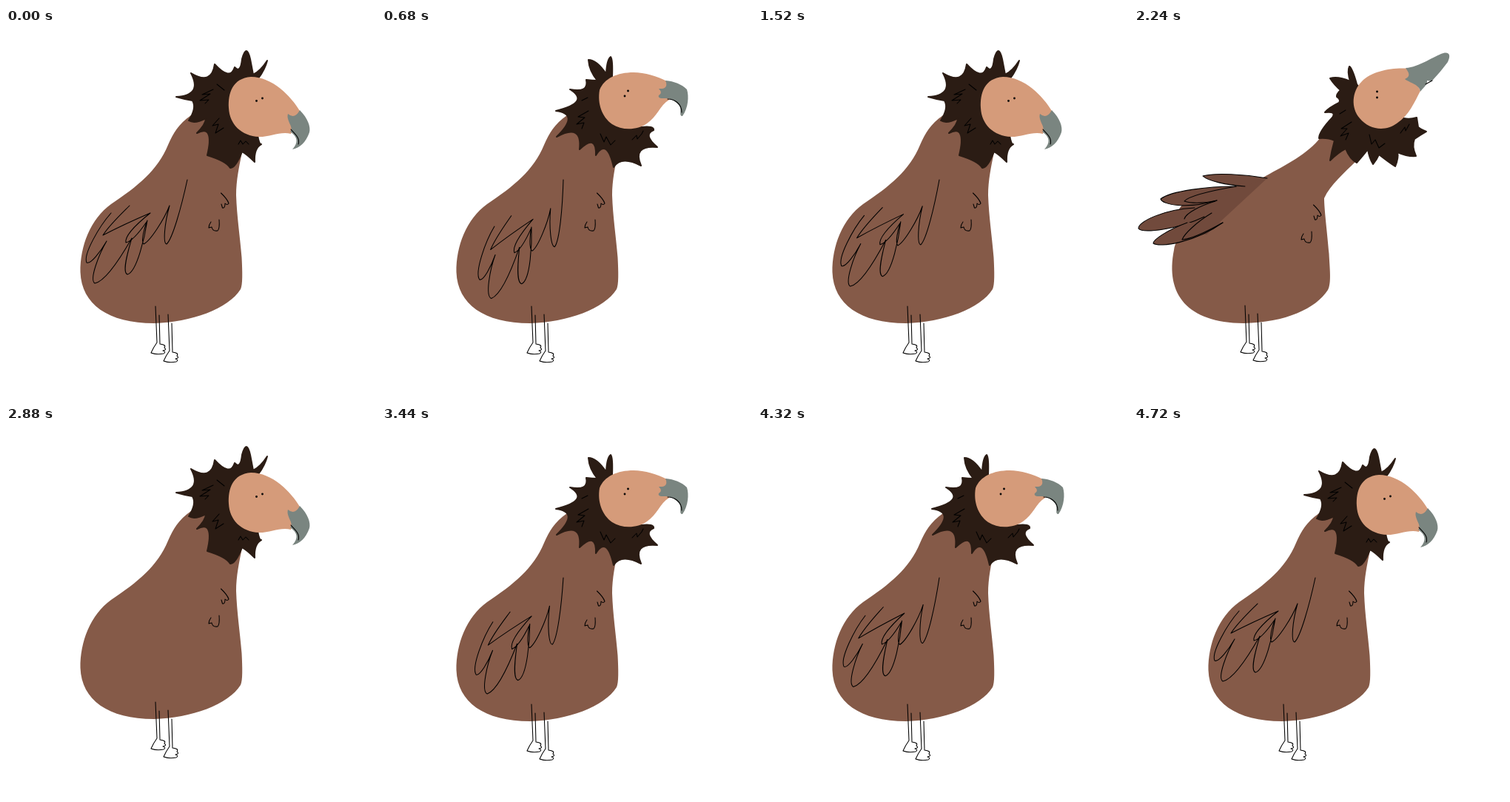
Write an HTML page with a canvas that moves like this. It is 500x500 px and loops after 4.76 s.

```html
<!DOCTYPE html>
<html lang="en">
<head>
<meta charset="utf-8">
<title>Bird</title>
<style>
html, body { margin: 0; height: 100%; overflow: hidden; background: #fff; }
canvas { display: block; width: 100vw; height: 100vh; }
</style>
</head>
<body>
<canvas id="stage" width="500" height="500"></canvas>
<script>
const ctx = document.getElementById('stage').getContext('2d');
const LOOP = 4760, STEP = 40, SECOND_SWING = 2920;
const BODY = '#855a48', RUFF = '#2b1c14', SKIN = '#d59b7a', BEAK = '#7a8580', WING = '#714a3c', INK = '#000';
const path = d => new Path2D(d);

const standing = path('M250,118C233,130 226,142 219,158C205,192 178,214 142,238C114,258 100,295 100.5,330C102,373 138,399 200,399C250,398 301,379 317,353C320,347 319.5,330 318.5,310C316,280 312,255 311,226C311,206 315,187 319,168L300,120Z');
const stretched = path('M252,148C235,170 205,185 178,200C130,225 60,262 54,300C42,360 72,398 148,399C205,398 246,379 262,354C267,345 264.5,325 263.5,305C261,275 257,245 257,230C265,212 285,195 300,180L300,140Z');

const heads = {
  down: {
    ruff: path('M230,93Q266,91 250,61Q278,78 282,49Q303,72 309,53Q317,62 319,42Q325,20 330,42L334,63Q344,58 353,44Q350,56 341,68L340,145Q342,158 345,157Q335,162 336,181Q325,170 319,167Q310,190 303,189Q298,180 272,172Q282,130 258,142Q270,130 270,122Q255,130 247,125Q258,108 252,98Q240,96 230,93Z'),
    face: path('M331,66C360,66 385,92 397,112L385,143C372,139 358,147 342,147C318,146 302,130 301,108C300,88 306,68 331,66Z'),
    beak: path('M381,116Q390,124 397,111C408,122 412,134 410,141C405,155 397,162 387,164C395,155 395,148 384,140C390,135 378,125 381,116Z'),
    lines: path('M385,137C389,142 398,148 395,157M280,83L265,90L276,89L262,98L274,97L269,102M288,122L279,132L287,130L283,142L294,135M314,157L317,152L320,157L324,153L328,157M285,76L295,84'),
    eyes: [[338.5, 98.5], [346.5, 95]]
  },
  up: {
    ruff: path('M311,66Q312,42 309,39Q304,42 303,62Q290,43 279,43Q280,58 291,71Q284,71 276,70Q280,88 254,83Q282,100 235,112Q268,116 236,147Q271,128 267,164Q290,142 289,172Q304,148 313,188Q323,172 350,186Q338,158 372,161Q352,144 367,138Q368,132 350,134L320,100Z'),
    face: path('M340,60C355,60 372,65 385,72L388,97C375,105 372,120 358,129C345,138 325,139 311,130C297,120 291,102 294,84C300,68 318,60 340,60Z'),
    beak: path('M383,71C395,72 405,76 412,83C415,92 414,108 406,119C400,119 407,109 400,103C396,98 388,95 384,95C381,95 372,96 374,91Q380,88 374,82Q388,83 383,71Z'),
    lines: path('M386,96C395,96 405,102 405,114M279,112L265,120L274,121L263,130L273,128L270,136M295,143L300,154L303,147L309,158L315,152M338,151L344,145L345,150L351,143L353,139M270,98L278,94'),
    eyes: [[332.5, 85], [328, 92]]
  },
  high: {
    ruff: path('M301,76Q295,54 291,52Q288,58 292,72Q276,65 265,68Q270,76 279,84Q273,90 274,93Q280,97 277,101Q263,108 258,114Q274,112 268,121Q250,140 250,149Q262,148 271,152Q267,166 265,179Q276,168 286,163Q292,178 301,182Q310,172 316,164Q318,176 323,184Q328,178 331,171Q345,182 353,187Q358,175 356,168Q370,174 381,173Q375,160 379,150Q388,144 395,140Q386,136 384,134L382,121Q372,124 365,122L320,100Z'),
    face: path('M372,55C350,53 322,58 308,72C294,86 293,108 305,122C318,138 340,140 355,129C372,118 379,100 387,85Z'),
    beak: path('M367,54C385,53 405,38 418,34C427,32 428,38 424,46C415,58 408,66 402,72L396,71C397,77 390,81 387,86C386,76 372,74 366,69C375,65 371,60 367,54Z'),
    lines: path('M403,71L394,76M294,127L280,136L288,136L279,146L290,142L286,151M318,144L321,157L326,151L331,162L339,156M360,142L366,134L367,139L372,130M278,116L286,111'),
    eyes: [[328.5, 86], [328.5, 94]]
  }
};

const scribble = path('M245,205C237,242 225,285 217,292C212,291 214,265 221,240C214,258 195,288 186,292C182,288 187,270 191,260C188,280 177,330 164,333C156,330 166,298 170,284C158,305 136,342 120,345C112,340 126,305 136,288C128,302 114,320 109,317C104,306 126,268 142,250M167,240C155,252 140,266 131,280Q160,265 195,250C180,262 160,280 162,290Q172,288 190,262');
const chest = path('M290.5,223Q299,231 301,237Q299,240 296,237Q296,244 292.5,243L291,238M277,262Q274,266 274,270L278,269Q279,275 286,274Q289,271 288,259');
const leg = path('M202,376L204,425Q199,432 196,439Q204,442 213,440Q217,438 212,436Q218,435 214,432Q217,428 208,427M207,388L208,427');
const spread = path('M180,203L138,213L70,232L60,246L66,276L98,279Z');
const feathers = [
  'M180,203C150,198 110,195 93,200C100,207 125,212 150,214',
  'M138,214C100,214 50,220 36,231C38,239 72,245 112,233',
  'M82,243C40,245 5,262 6,271C12,278 60,272 95,255',
  'M72,263C45,273 26,286 26,291C35,297 82,290 120,263'
].map(path);
const barbs = path('M138,214C115,218 75,226 68,234C80,238 100,236 112,233M110,234C90,240 70,250 68,258M105,250C85,262 68,278 65,286C80,285 104,272 120,263');

function fill(shape, color) {
  ctx.fillStyle = color;
  ctx.fill(shape);
}

// Fill with slightly rounded corners.
function fillSoft(shape, color) {
  fill(shape, color);
  ctx.save();
  ctx.strokeStyle = color;
  ctx.lineWidth = 2;
  ctx.stroke(shape);
  ctx.restore();
}

function ink(shape, x = 0, y = 0, angle = 0) {
  ctx.save();
  ctx.translate(x, y);
  ctx.translate(245, 205);
  ctx.rotate(angle);
  ctx.translate(-245, -205);
  ctx.stroke(shape);
  ctx.restore();
}

function drawHead({ ruff, face, beak, lines, eyes }) {
  fillSoft(ruff, RUFF);
  fill(face, SKIN);
  fill(beak, BEAK);
  ink(lines);
  ctx.fillStyle = INK;
  for (const [x, y] of eyes) {
    ctx.beginPath();
    ctx.arc(x, y, 1.4, 0, Math.PI * 2);
    ctx.fill();
  }
}

function drawLegs(x, y) {
  ink(leg, x, y);
  ink(leg, x + 17, y + 11);
}

function drawStanding(head, wingAngle) {
  fill(standing, BODY);
  ink(chest);
  if (wingAngle !== null) ink(scribble, 0, 0, wingAngle);
  drawLegs(0, 0);
  drawHead(head);
}

function drawStretched() {
  fill(stretched, BODY);
  fill(spread, WING);
  for (const feather of feathers) {
    fill(feather, WING);
    ink(feather);
  }
  ink(barbs);
  ink(chest, -48, 16);
  drawLegs(-52, -1);
  drawHead(heads.high);
}

// Linear interpolation through [time, value] keys.
function track(keys, t) {
  const i = keys.findIndex(([time]) => time > t);
  if (i < 0) return keys[keys.length - 1][1];
  if (i === 0) return keys[0][1];
  const [t0, a] = keys[i - 1], [t1, b] = keys[i];
  return a + (b - a) * (t - t0) / (t1 - t0);
}

const hop = [[1720, -2.5], [1760, -3], [1920, -3], [1960, -5], [2000, 4], [2240, 0], [2560, 0], [2720, 4], [2760, -5], [2880, -3]];
const ease = p => (1 - Math.cos(Math.PI * Math.min(p, 1))) / 2;
const swing = s => s < 740 ? ease(s / 740) : 1 - ease((s - 740) / 1080);

function draw(t) {
  ctx.fillStyle = '#fff';
  ctx.fillRect(0, 0, 500, 500);
  ctx.strokeStyle = INK;
  ctx.lineWidth = 1.05;
  ctx.lineCap = ctx.lineJoin = 'round';
  ctx.save();
  if (t >= 1720 && t < SECOND_SWING) {
    ctx.translate(0, track(hop, t));
    if (t >= 2000 && t < 2760) drawStretched();
    else drawStanding(heads.down, null);
  } else {
    const s = t % SECOND_SWING;
    const head = s >= 400 && s < 1440 ? heads.up : heads.down;
    drawStanding(head, -0.187 * swing(s));
  }
  ctx.restore();
}

const start = performance.now();
function tick() {
  const t = (performance.now() - start) % LOOP;
  draw(Math.floor(t / STEP) * STEP);
  requestAnimationFrame(tick);
}
tick();
</script>
</body>
</html>
```
